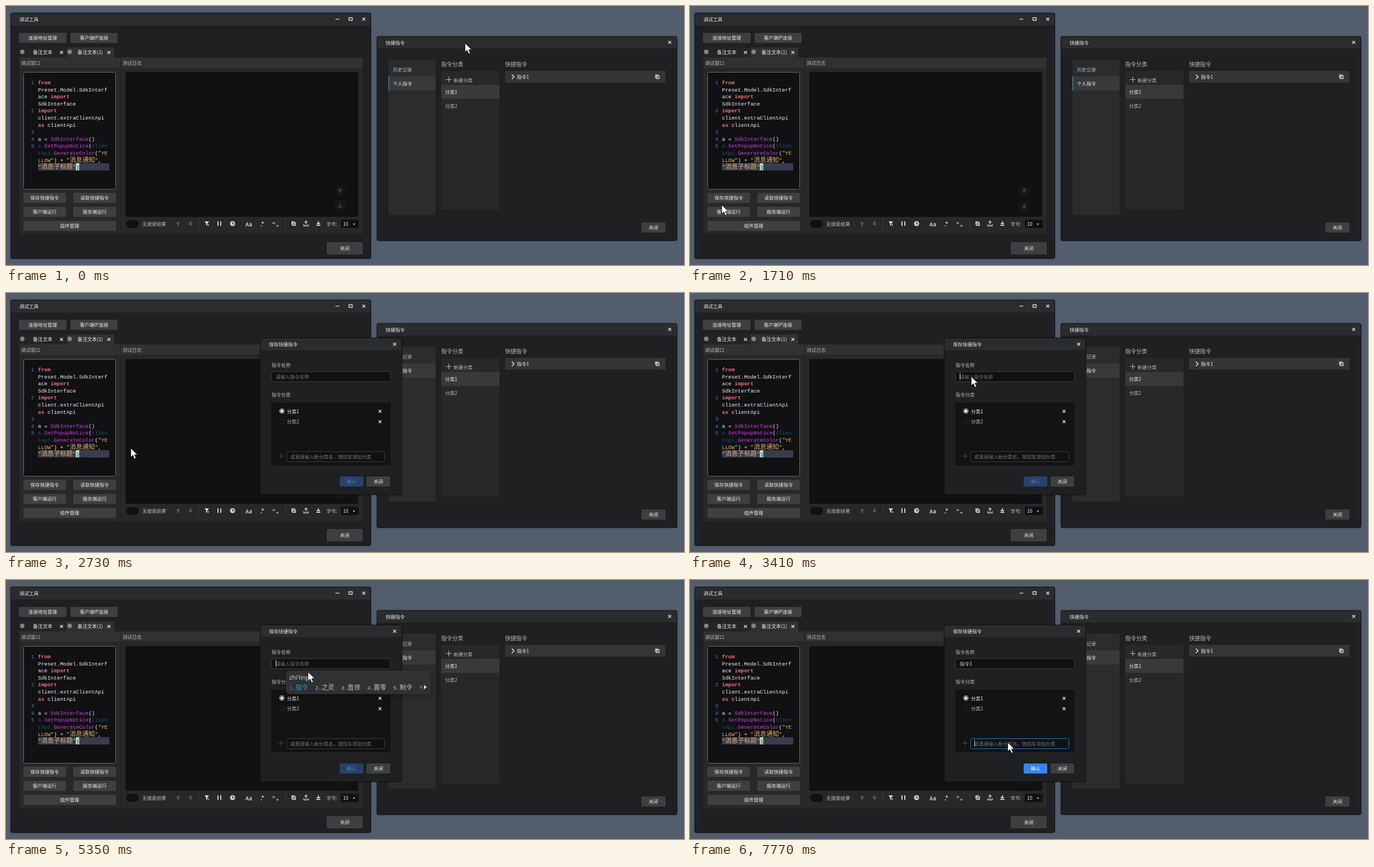
Recreate the animation shown at these times as an HTML page with a canvas. Size 1209 px wide and 463 px high, loop 8 s.

```html
<!DOCTYPE html>
<html lang="zh-CN">
<head>
<meta charset="utf-8">
<style>
html, body { margin: 0; width: 100%; height: 100%; overflow: hidden; background: #525d6d; }
canvas { display: block; }
</style>
</head>
<body>
<canvas id="stage" width="1209" height="463"></canvas>
<script>
const ctx = document.getElementById('stage').getContext('2d');
const LOOP = 8000;
const UI = '"Noto Sans CJK SC", "Noto Sans CJK", sans-serif';
const MONO = '"Liberation Mono", "Noto Sans CJK SC", "Noto Sans CJK", monospace';
const C = {
  body: '#1f2021', bar: '#2b2c2d', panel: '#272828', raised: '#38393a', button: '#3e3f3f',
  well: '#111113', text: '#eee', soft: '#bcbcbc', dim: '#777', blue: '#3385ff'
};

function box(x1, y1, x2, y2, fill, r = 0, stroke) {
  ctx.beginPath();
  ctx.roundRect(x1, y1, x2 - x1, y2 - y1, r);
  if (fill) { ctx.fillStyle = fill; ctx.fill(); }
  if (stroke) {
    ctx.beginPath();
    ctx.roundRect(x1 + .5, y1 + .5, x2 - x1 - 1, y2 - y1 - 1, r);
    ctx.strokeStyle = stroke; ctx.lineWidth = 1; ctx.stroke();
  }
}

function text(s, x, y, color = C.text, size = 8.5, align = 'left', font = UI, weight = 400) {
  ctx.font = `${weight} ${size}px ${font}`;
  ctx.textAlign = align;
  ctx.fillStyle = color;
  ctx.fillText(s, x, y + size * .37);
}

function disc(x, y, r, color) {
  ctx.beginPath();
  ctx.arc(x, y, r, 0, Math.PI * 2);
  ctx.fillStyle = color;
  ctx.fill();
}

// Strokes or fills an SVG path placed at (x, y).
function icon(d, x, y, color, width = 1.2, filled = false) {
  const path = new Path2D(d);
  ctx.save();
  ctx.translate(x, y);
  ctx.lineWidth = width;
  ctx.strokeStyle = ctx.fillStyle = color;
  if (filled) ctx.fill(path); else ctx.stroke(path);
  ctx.restore();
}

const cross = (x, y, r = 2.6, color = '#ddd') =>
  icon(`M${-r} ${-r}L${r} ${r}M${r} ${-r}L${-r} ${r}`, x, y, color, 1.4);
const plus = (x, y, color) => icon('M-5 0H5M0 -5V5', x + .5, y + .5, color, 1);

function button(label, x1, y1, x2, y2, fill = C.button, color = C.text) {
  box(x1, y1, x2, y2, fill, 2);
  text(label, (x1 + x2) / 2, (y1 + y2) / 2 + .3, color, 8.5, 'center');
}

function frame(title, x1, y1, x2, y2, barHeight) {
  ctx.save();
  ctx.shadowColor = 'rgba(0,0,0,.3)';
  ctx.shadowBlur = 3;
  box(x1, y1, x2, y2, C.body, 4);
  ctx.restore();
  box(x1, y1, x2, y1 + barHeight, C.bar, [4, 4, 0, 0]);
  box(x1, y1, x2, y2, null, 4, '#111213');
  text(title, x1 + 16, y1 + barHeight / 2 + .5);
}

const INK = { k: '#f07178', t: '#f0f0f0', f: '#cf40e6', s: '#e0b76c', d: '#1d5375' };
const CODE = [
  [1, 'k', 'from'], [0, 't', 'Preset.Model.SdkInterf'], [0, 't', 'ace ', 'k', 'import'],
  [0, 't', 'SdkInterface'], [2, 'k', 'import'], [0, 't', 'client.extraClientApi'],
  [0, 'k', 'as', 't', ' clientApi'], [3], [4, 't', 'a = ', 'f', 'SdkInterface', 't', '()'],
  [5, 'd', 'a.', 'f', 'SetPopupNotice', 't', '(', 'd', 'clien'],
  [0, 'd', 'tApi.', 'f', 'GenerateColor', 't', '(', 's', '"YE'],
  [0, 's', 'LLOW"', 't', ') + ', 's', '"消息通知"', 't', ','], [0, 's', '"消息子标题"']
];
const CELL = 5.64;

function codeText(s, x, y, color, weight, align) {
  const wide = s.charCodeAt(0) > 255;
  text(s, x, wide ? y : y + .6, color, wide ? CELL * 2 : 9.4, align, wide ? UI : MONO, weight);
}

function drawCode() {
  box(57, 281, 184, 294, '#3a3b4e');
  box(124.5, 281, 130.5, 294, '#a9e6c8');
  codeText(')', 124.7, 287.5, '#123');
  CODE.forEach(([number, ...runs], row) => {
    const y = 136 + row * 12.6;
    if (number) codeText(String(number), 50.5, y, '#4a7fb0', 400, 'right');
    let x = 57;
    for (let i = 0; i < runs.length; i += 2) {
      const weight = runs[i] === 'k' ? 700 : 400;
      for (const part of runs[i + 1].match(/[\u4e00-\u9fff]+|[^\u4e00-\u9fff]+/g)) {
        codeText(part, x, y, INK[runs[i]], weight);
        x += part.length * CELL * (part.charCodeAt(0) > 255 ? 2 : 1);
      }
    }
  });
}

function drawToolbar() {
  box(213, 381, 238, 398, C.well, 9, '#333435');
  text('无搜索结果', 243, 390, C.soft);
  icon('M0 -4L4 0H1.5V4H-1.5V0H-4Z', 307, 389, '#555', 1, true);
  icon('M0 4L4 0H1.5V-4H-1.5V0H-4Z', 329, 389, '#555', 1, true);
  box(343, 380, 344, 399, '#3c3d3e');
  box(498, 380, 499, 399, '#3c3d3e');
  icon('M-4 -4H4L1 0V4L-1 3V0ZM2 1H4V2H2ZM2 3H4V4H2Z', 358, 389, '#ddd', 1, true);
  box(377, 385, 379, 393, '#ccc');
  box(382, 385, 384, 393, '#ccc');
  disc(404, 389, 4.6, '#ccc');
  icon('M0 -3V.5H3', 404, 389, C.panel, 1.2);
  text('Aa', 433, 390, '#ccc', 9.5, 'center', UI, 700);
  text('.*', 457, 390, '#ccc', 11, 'center', UI, 700);
  const quotes = '"Liberation Sans", sans-serif';
  text('“', 477.5, 390, '#ccc', 11, 'center', quotes, 700);
  text('„', 484, 389, '#ccc', 11, 'center', quotes, 700);
  icon('M-4 -4H2V-2.5H4V4H-2.5V2.5H-4Z', 513, 389, '#c4c4c4', 1, true);
  icon('M-1.5 -1H2.5M-1.5 1.5H2.5', 513, 389, C.panel, 1);
  icon('M0 2V-4M-2.5 -2L0 -4.5L2.5 -2M-4 1V4H4V1', 535, 389, '#ccc', 1.3);
  icon('M-1 -4H1V-1H3V1H-3V-1H-1ZM-3 2H3L4 4H-4Z', 557, 389, '#ccc', 1, true);
  text('字号:', 571.5, 390, C.soft);
  box(597, 382, 629, 397, C.well, 2);
  text('10', 601, 390);
  icon('M-2 -1H2L0 1.5Z', 620.5, 390, '#ddd', 1, true);
}

function drawMain() {
  frame('调试工具', 8, 12, 651, 452, 23);
  icon('M-3.5 0H3.5', 591, 23.5, '#ddd', 1.3);
  icon('M-3 -2H3V2.5H-3Z', 614.5, 23, '#ddd', 1.3);
  cross(638, 23.5);
  button('连接地址管理', 23, 48, 108, 66);
  button('客户端IP连接', 115, 48, 199, 66);
  box(24, 74, 108, 92, '#232425');
  box(108, 74, 193, 92, '#303131');
  for (const x of [29, 113.5]) disc(x, 82, 4, '#858585');
  text('备注文本', 48, 83, C.text, 8.7);
  cross(99, 83);
  text('备注文本(1)', 127.5, 83, C.text, 8.7);
  cross(183.5, 83);

  box(24, 92, 636, 408, C.panel);
  box(24, 92, 636, 110, '#303131');
  box(204, 92, 205, 408, C.body);
  text('调试窗口', 27, 101.5, C.soft);
  text('测试日志', 208, 101.5, C.soft);
  box(31, 118, 196, 328, C.well, 3, '#6a6b6c');
  drawCode();
  button('保存快捷指令', 31, 334, 107, 352);
  button('读取快捷指令', 120, 334, 196, 352);
  button('客户端运行', 31, 359, 107, 377);
  button('服务端运行', 120, 359, 196, 377);
  button('组件管理', 31, 384, 196, 402);

  box(213, 118, 628, 377, C.well, 3);
  for (const y of [331, 357]) disc(596, y, 11, '#161617');
  icon('M-4 -3.5H4M0 4V-2M-2.5 .5L0 -2L2.5 .5', 596, 331, '#5c5c5c', 1);
  icon('M-4 3.5H4M0 -4V2M-2.5 -.5L0 2L2.5 -.5', 596, 357, '#5c5c5c', 1);
  drawToolbar();
  button('关闭', 572, 422, 636, 444);
}

function drawShortcuts() {
  frame('快捷指令', 661, 54, 1197, 420, 22);
  cross(1183.5, 65);
  box(682, 96, 766, 373, C.bar);
  box(682, 126, 766, 151, C.raised);
  box(682, 126, 683, 151, '#4aa6b8');
  text('历史记录', 690, 113.5, C.soft);
  text('个人指令', 690, 138.5);
  text('指令分类', 776, 104, C.soft, 9.8);
  box(776, 116, 880, 364, C.panel);
  plus(789, 131, '#bbb');
  text('新建分类', 798, 132.5, C.soft);
  box(776, 141, 880, 166, C.raised);
  text('分类1', 783, 154);
  text('分类2', 783, 178.5, C.soft);
  text('快捷指令', 890, 104, C.soft, 9.8);
  box(890, 116, 1176, 137, '#343535');
  icon('M-2 -4L2 0L-2 4', 904, 126.5, '#eee', 1.4);
  text('指令1', 911, 127);
  icon('M-4 -4H2V-2.5H4V4H-2.5V2.5H-4Z', 1161.5, 126.5, '#bbb', 1, true);
  icon('M-1 .8H3M1 -1.2V2.8', 1161.5, 126.5, '#343535', 1);
  button('关闭', 1133, 387, 1176, 405);
}

function caret(x, y) { box(x, y - 6, x + 1, y + 6, '#ddd'); }

function categoryInput(y, active, focused) {
  plus(490, y - 1, active ? '#bbb' : '#4b4b4b');
  box(500, y - 9, 676, y + 10, C.well, 3, focused ? '#1f78c0' : '#3b3c3d');
  text('或直接输入新分类名，按回车添加分类', 507, y + 1, C.dim);
  if (focused) caret(507, y);
}

function drawLoading() {
  icon('M-6 6.5V1L-4 -2.5H4L6 1V6.5ZM-6 1H-2.5L-1.5 3H1.5L2.5 1H6M0 -4V-6.5M-4 -4L-5.5 -6M4 -4L5.5 -6',
    579, 212, '#888', 1);
  ctx.save();
  ctx.beginPath();
  ctx.rect(550, 216, 60, 5.5);
  ctx.clip();
  text('当前无分类', 579, 221, '#aaa', 8.5, 'center');
  ctx.restore();
  categoryInput(236, true, false);
  disc(578.5, 270, 18, '#555858');
  disc(578.5, 270, 14, '#333537');
  box(577, 261, 580, 272, '#a3131c');
  text('加载数据中，请稍后...', 579, 301.5, C.soft, 8.5, 'center');
}

function caretVisible(t) {
  if (t < 3140) return false;
  if (t < 5480) return Math.floor((t - 3140) / 530) % 2 === 0;
  return t < 6610 || (t >= 7140 && t < 7640);
}

function drawDialog(t) {
  const loading = t < 2320;
  const name = t < 5480 ? '' : t < 5880 ? '指令' : '指令3';
  frame('保存快捷指令', 453, 80, 706, 361, 22);
  cross(693, 91.5);
  text('指令名称', 473.5, 128.5, C.soft);
  box(473, 140, 686, 159, C.well, 3, '#3b3c3d');
  text(name || '请输入指令名称', 481, 149.5, name ? '#ccc' : C.dim);
  if (caretVisible(t)) caret(name ? (name.length > 2 ? 503 : 498) : 481, 149);
  text('指令分类', 473.5, 182, C.soft);
  box(473, 196, 686, 308, '#131314', 3);
  if (loading) {
    drawLoading();
  } else {
    disc(492, 211, 4.6, '#ddd');
    disc(492, 211, 3.6, '#161617');
    disc(492, 211, 2.6, '#fff');
    disc(492, 230, 4.6, '#303031');
    disc(492, 230, 3.7, '#131314');
    text('分类1', 501, 211.5);
    text('分类2', 501, 230, C.soft);
    cross(667, 211.5, 2.4);
    cross(667, 230, 2.4);
    categoryInput(292, false, t >= 7770);
  }
  const enabled = loading || name;
  button('确认', 595, 328, 637, 346, enabled ? C.blue : '#25426d', enabled ? '#fff' : '#65789a');
  button('关闭', 643, 328, 685, 346);
}

const TYPED = [
  [4610, 'z'], [4750, 'zh'], [4880, 'zhi'], [5080, "zhi'l"],
  [5210, "zhi'li"], [5280, "zhi'lin"], [5350, "zhi'ling"]
];
const CHOICES = {
  z: '在中再做这', zh: '这中只着知', zhi: '只之指知制',
  long: ['指令', '之灵', '直领', '置零', '制令']
};

function drawCandidates(t) {
  if (t < 4610 || t >= 5480) return;
  const typed = TYPED.filter(([at]) => at <= t).pop()[1];
  const choices = [...(CHOICES[typed] || CHOICES.long)];
  const long = choices[0].length > 1;
  const pitch = long ? 46.4 : 35;
  const right = long ? 757 : 701;
  ctx.save();
  ctx.shadowColor = 'rgba(0,0,0,.25)';
  ctx.shadowBlur = 9;
  ctx.shadowOffsetY = 3;
  box(499, 162, right, 204, '#303132', 7);
  ctx.restore();
  text(typed, 505, 174, '#ddd', 11, 'left', '"Open Sans", sans-serif');
  const end = Math.round(505 + ctx.measureText(typed).width);
  box(end, 168, end + 1, 180, '#2aa0dc');
  choices.forEach((word, i) => {
    const color = i ? '#c4c4c4' : '#2199d6';
    const x = 505 + i * pitch;
    codeText(`${i + 1}.`, x, 191.5, color);
    codeText(word, x + CELL * 2, 191.5, color, 300);
  });
  icon('M2 -4V4L-2 0Z', right - 17.5, 191.5, '#686868', 1, true);
  icon('M-2 -4V4L2.5 0Z', right - 9.5, 191.5, '#eee', 1, true);
}

// Pointer keyframes: time, x, y.
const PATH = [
  [0, 818, 66], [590, 818, 66], [800, 640, 150], [1080, 319, 266], [1430, 66, 379],
  [1640, 46, 358], [1850, 75, 348], [2450, 75, 348], [2800, 290, 245], [3210, 501, 148],
  [3340, 501, 148], [3410, 501, 149], [3600, 501, 149], [3950, 538, 166], [4210, 538, 166],
  [4280, 538, 164], [6870, 538, 164], [7640, 566, 290], [LOOP, 566, 290]
];

function pointerAt(t) {
  const i = PATH.findIndex(p => p[0] > t);
  const [t0, x0, y0] = PATH[i - 1], [t1, x1, y1] = PATH[i];
  const k = (t - t0) / (t1 - t0);
  return [Math.round(x0 + (x1 - x0) * k), Math.round(y0 + (y1 - y0) * k)];
}

function drawPointer(t) {
  const tick = Math.max(0, Math.floor((t - 30) / 70) * 70 + 30);
  const [x, y] = pointerAt(tick);
  if (tick >= 1010 && tick < 1150) {
    const d = 'M-11 0L-6 -4.5V-1H6V-4.5L11 0L6 4.5V1H-6V4.5Z';
    icon(d, x, y, '#111', 1.5);
    icon(d, x, y, '#fff', 1, true);
    return;
  }
  const d = 'M0 0V16L3.8 12.6L6.6 19L9.4 17.8L6.7 11.6H12Z';
  icon(d, x + .5, y + .5, '#fff', 1, true);
  icon(d, x + .5, y + .5, '#111', .9);
}

function render(t) {
  ctx.fillStyle = '#525d6d';
  ctx.fillRect(0, 0, 1209, 463);
  drawMain();
  drawShortcuts();
  if (t >= 2040) drawDialog(t);
  drawCandidates(t);
  drawPointer(t);
}

const start = performance.now();
function loop() {
  render((performance.now() - start) % LOOP);
  requestAnimationFrame(loop);
}
loop();
</script>
</body>
</html>
```
